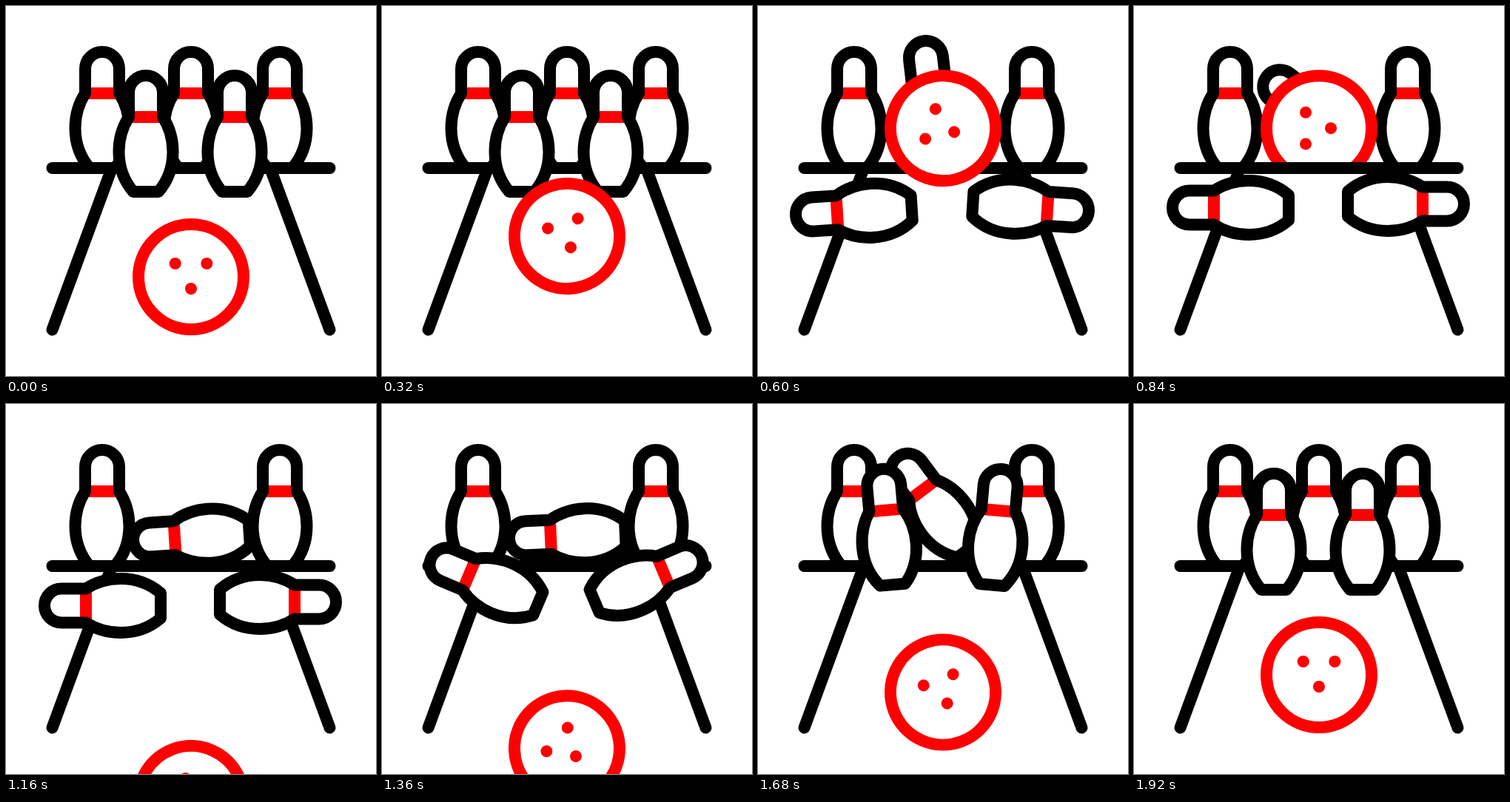
Animation of 500 by 500 pixels, one loop 2 s. Source, as an HTML page:

```html
<!DOCTYPE html>
<html lang="en">
<head>
<meta charset="utf-8">
<title>Bowling</title>
<style>
  html, body { margin: 0; width: 100%; height: 100%; overflow: hidden; background: #fff; }
  svg { display: block; width: 100%; height: 100%; }
  .ink { fill: none; stroke: #000; stroke-width: 16; stroke-linecap: round; stroke-linejoin: round; }
  .ring { fill: #fff; stroke: #f00; stroke-width: 16; }
  .red { fill: #f00; }
</style>
</head>
<body>
<svg viewBox="0 0 500 500">
  <defs>
    <clipPath id="aboveLine"><rect width="500" height="219"/></clipPath>
    <path id="shape" d="M-17 79C-29 65-36.5 46-36.5 25C-36.5 8-32-8-23-22V-55A23 23 0 0 1 23-55V-22C32-8 36.5 8 36.5 25C36.5 46 29 65 17 79Z"/>
    <!-- Pin with its origin at mid-height -->
    <g id="pin">
      <use href="#shape" fill="#fff"/>
      <rect class="red" x="-22" y="-30" width="44" height="16"/>
      <use href="#shape" class="ink"/>
    </g>
  </defs>
  <g id="scene">
    <path class="ink" d="M143 219L62.5 437.5M357 219L437.5 437.5"/>
    <use id="middle" href="#pin"/>
    <use href="#pin" x="130" y="140"/>
    <use href="#pin" x="370" y="140"/>
    <path id="line" class="ink" d="M62.5 219H437.5"/>
    <use id="left" href="#pin"/>
    <use id="right" href="#pin"/>
    <g id="ball">
      <g id="spin">
        <circle class="ring" r="71"/>
        <circle class="red" cx="-21.3" cy="-18" r="8"/>
        <circle class="red" cx="21.3" cy="-18" r="8"/>
        <circle class="red" cy="16" r="8"/>
      </g>
    </g>
  </g>
</svg>
<script>
const LOOP = 2000, STEP = 40;
const get = id => document.getElementById(id);
const [scene, line, ball, spin, middle, left, right] =
  ['scene', 'line', 'ball', 'spin', 'middle', 'left', 'right'].map(get);

// 0 before a, 1 after b, linear between
const ramp = (a, b, t) => Math.min(1, Math.max(0, (t - a) / (b - a)));
// Thrown-body path from 0 to 1: rises first, then falls
const toss = (u, lift) => u - lift * u * (1 - u);

function place(el, x, y, turn) {
  el.setAttribute('transform', `translate(${x} ${y}) rotate(${turn})`);
}

// Front pins tip outwards, sink slightly too far and settle
function drawFront(t) {
  const u = 1.02 * (ramp(340, 600, t) - ramp(1280, 1800, t))
    - 0.02 * (ramp(600, 700, t) - ramp(1240, 1280, t));
  const fall = toss(u, 1.67), turn = 90 * u * u;
  place(left, 189 - 59 * u, 172 + 100.5 * fall, -turn);
  place(right, 309 + 59 * u, 172 + 95.5 * fall, turn);
}

// The middle pin hops left, lies down and later hops back
function drawMiddle(t) {
  const rest = 1 - ramp(500, 1200, t) + ramp(1300, 1920, t);
  const u = 1 - rest * rest;
  place(middle, 250 - 100 * u * (1 - u) ** 1.5, 140 + 40.4 * toss(u, 3.3), -94.3 * u * u);
}

function ballY(t) {
  if (t < 600) return 366 - 200.5 * ramp(140, 600, t) ** 1.378;
  if (t < 1040) return 120.5 + 0.0031 * (t - 720) ** 2;
  return 366 + 167 * (Math.max(0, 1920 - t) / 760) ** 1.7;
}

function drawBall(t) {
  // After its highest point the ball drops behind the line
  const behind = t >= 720 && t < 1040;
  const next = behind ? line : null;
  if (ball.nextElementSibling !== next) scene.insertBefore(ball, next);
  if (behind) ball.setAttribute('clip-path', 'url(#aboveLine)');
  else ball.removeAttribute('clip-path');

  const turn = 90 * Math.min(ramp(140, 680, t) ** 1.46, ramp(1920, 875, t));
  place(spin, 250, ballY(t), -turn);
}

const start = performance.now();
function tick() {
  const now = (performance.now() - start) % LOOP;
  const t = Math.floor(now / STEP) * STEP;
  drawFront(t);
  drawMiddle(t);
  drawBall(t);
  requestAnimationFrame(tick);
}
tick();
</script>
</body>
</html>
```
